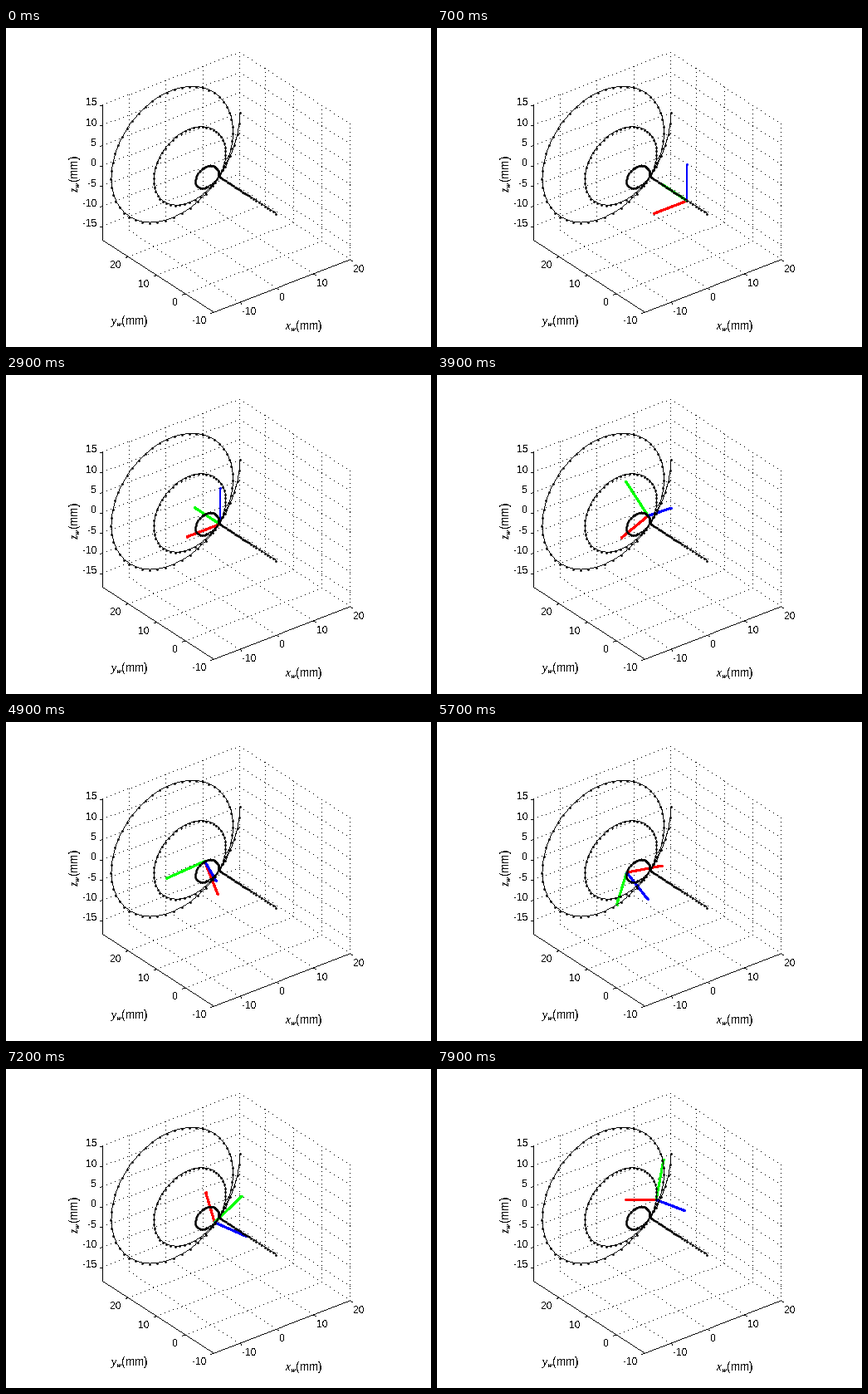
These frames come from a looping animation (512x384 px, 8 s). A matplotlib script:

```python
import numpy as np
import matplotlib.pyplot as plt
from matplotlib.animation import FuncAnimation

W, H, DPI = 512, 384, 100
PX = 72 / DPI  # points per pixel
FRAMES, STEP = 80, 100

plt.rcParams.update({
    "mathtext.fontset": "custom",
    "mathtext.rm": "Liberation Sans",
    "mathtext.it": "Liberation Serif:italic",
    "text.antialiased": False,
})

fig = plt.figure(figsize=(W / DPI, H / DPI), dpi=DPI, facecolor="white")
ax = fig.add_axes([0, 0, 1, 1])
ax.set_xlim(-0.5, W - 0.5)
ax.set_ylim(H - 0.5, -0.5)
ax.axis("off")

# Orthographic view, azimuth -37.5, elevation 30
AZ, EL, SCALE = np.radians(37.5), np.radians(30), 5.62
VIEW = SCALE * np.array([
    [np.cos(AZ), -np.sin(AZ), 0],
    [-np.sin(AZ) * np.sin(EL), -np.cos(AZ) * np.sin(EL), -np.cos(EL)],
])
CENTRE = np.array([290.6, 200.8])

X0, X1 = -17, 20
Y0, Y1 = -10, 28.9
Z0, Z1 = -18.5, 15


def proj(p):
    return np.asarray(p, float) @ VIEW.T + CENTRE


def trace(*pts, gap=1, zorder=2):
    """Polyline of single pixels, one every gap pixels."""
    q = proj(pts)
    parts = []
    for a, b in zip(q[:-1], q[1:]):
        n = max(1, int(np.ceil(np.abs(b - a).max() / gap)))
        parts.append(a + (b - a) * np.linspace(0, 1, n + 1)[:, None])
    ax.plot(*np.vstack(parts).T, ls="none", marker=",", color="black", zorder=zorder)


def grid(*pts):
    trace(*pts, gap=5, zorder=1)


def tick(p, step, text, dx, dy, ha):
    trace(p, np.add(p, step))
    x, y = proj(p)
    ax.text(x + dx, y + dy, text, ha=ha, va="center_baseline",
            family="Liberation Sans", size=12 * PX)


# Box, grid, ticks
trace((X0, Y1, Z1), (X0, Y1, Z0), (X0, Y0, Z0), (X1, Y0, Z0))
for x in (-10, 0, 10, 20):
    grid((x, Y0, Z0), (x, Y1, Z0), (x, Y1, Z1))
    tick((x, Y0, Z0), (0, -0.8, 0), str(x), 4, 10, "left")
for y in (-10, 0, 10, 20):
    grid((X0, y, Z0), (X1, y, Z0), (X1, y, Z1))
    tick((X0, y, Z0), (-0.7, 0, 0), str(y), -8, 9, "right")
for z in range(-15, 16, 5):
    grid((X0, Y1, z), (X1, Y1, z), (X1, Y0, z))
    tick((X0, Y1, z), (-0.7, 0, 0), str(z), -7, -4, "right")

for name, x, y, rot in (("x", 358, 359, 0), ("y", 148, 353, 0), ("z", 82, 175, 90)):
    ax.text(x, y, rf"${name}_w\mathrm{{(mm)}}$", size=13.5 * PX,
            ha="center", va="center", rotation=rot)

# Path: along the y axis, then a widening conical spiral
CORNER, PER_TURN, TURNS = 30, 50, 3
GROW, RISE = 6.75, 2 * np.pi
Y_CORNER = 10.3
LAST = CORNER + PER_TURN * TURNS


def path(k):
    if k <= CORNER:
        return np.array([0, np.interp(k, [0, 9, CORNER], [Y0, -1, Y_CORNER]), 0])
    n = (k - CORNER) / PER_TURN
    a = 2 * np.pi * n
    return np.array([GROW * n * np.cos(a), Y_CORNER + RISE * n, GROW * n * np.sin(a)])


def unit(v):
    return v / np.linalg.norm(v)


def tangent(k):
    k = max(k, 1)
    return unit(path(k) - path(k - 1))


def triad(k):
    """Normal, tangent and binormal from backward differences."""
    t = tangent(k)
    d = t - tangent(k - 1)
    d -= t * (d @ t)
    n = unit(d) if np.linalg.norm(d) > 1e-6 else np.array([-1.0, 0, 0])
    return n, t, np.cross(t, n)


points = [path(k) for k in range(LAST + 1)]
trace(*points, zorder=5)
ax.plot(*proj(points).T, ls="none", marker="o", color="black", ms=2.8 * PX,
        mew=0, antialiased=False, zorder=5)

AXIS_LEN = 9
arms = [ax.plot([], [], color=c, lw=2 * PX, marker="o", ms=3 * PX, mew=0,
                markevery=[1], solid_capstyle="butt", antialiased=False,
                zorder=3)[0]
        for c in ("#ff0000", "#00ff00", "#0000ff")]


def update(k):
    p = path(k)
    for arm, d in zip(arms, triad(k)):
        arm.set_data(*proj([p, p + AXIS_LEN * d]).T)
        arm.set_visible(k > 0)
    return arms


anim = FuncAnimation(fig, update, frames=FRAMES, interval=STEP,
                     repeat=True, repeat_delay=0, blit=False)
plt.show()
```
